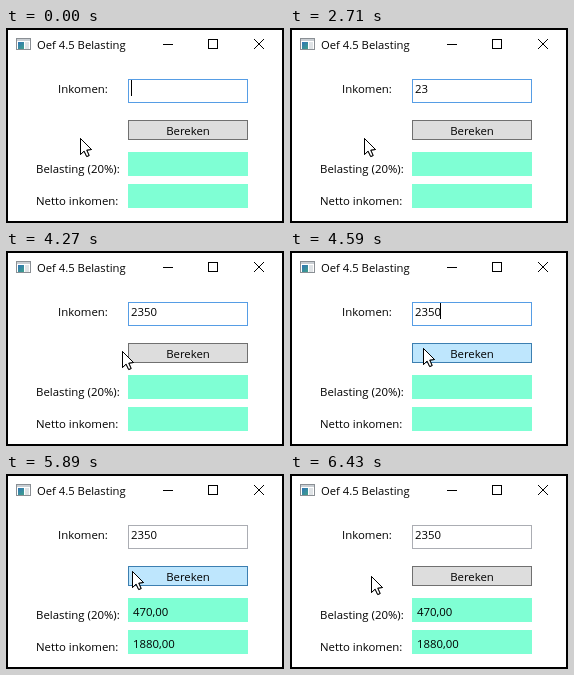
Write an HTML page with a canvas that moves like this. It is 278 px wide and 195 px high and loops after 8310 ms.

```html
<!DOCTYPE html>
<html lang="nl">
<head>
<meta charset="utf-8">
<title>Oef 4.5 Belasting</title>
<style>
html, body { margin: 0; width: 100%; height: 100%; overflow: hidden; background: #fff; }
canvas { display: block; width: 278px; height: 195px; }
</style>
</head>
<body>
<canvas id="stage"></canvas>
<script>
const W = 278, H = 195, LOOP = 8310;
const canvas = document.getElementById('stage');
const ctx = canvas.getContext('2d');
const dpr = window.devicePixelRatio || 1;
canvas.width = W * dpr;
canvas.height = H * dpr;

const FONT = '"Open Sans", "Noto Sans", sans-serif';
const INPUT = '2350';
const KEY_TIMES = [1760, 2170, 2950, 3250];
const CARET_ON = [[0, 220], [680, 1160], [1760, 2090], [2170, 2710], [2950, 3870], [4430, 4910]];
const PRESS = 4990, RELEASE = 5160, STEP = 80;

// Pointer positions, one per 80 ms step
const REST = [74, 110];
const APPROACH = [[86, 108], [102, 104], [116, 100], [125, 98], [130, 97], [132, 97], [133, 97]];
const LEAVE = [[126, 97], [115, 98], [105, 99], [97, 100], [91, 101], [86, 101], [83, 102], [81, 102]];

function pointerAt(t) {
  const pick = (list, start) => list[Math.min(list.length - 1, Math.floor((t - start) / STEP))];
  if (t < 4110) return REST;
  if (t < 5890) return pick(APPROACH, 4110);
  return pick(LEAVE, 5870);
}

function fill(x, y, w, h, color) {
  ctx.fillStyle = color;
  ctx.fillRect(x, y, w, h);
}

function box(x, y, w, h, border, inside) {
  fill(x, y, w, h, border);
  fill(x + 1, y + 1, w - 2, h - 2, inside);
}

function text(str, x, y, size = 11.4, align = 'left') {
  ctx.font = size + 'px ' + FONT;
  ctx.textAlign = align;
  ctx.fillStyle = '#000';
  ctx.fillText(str, x, y);
}

function line(points, color, close) {
  ctx.beginPath();
  points.forEach(([x, y]) => ctx.lineTo(x, y));
  if (close) ctx.closePath();
  ctx.strokeStyle = color;
  ctx.lineWidth = 1;
  ctx.stroke();
}

function drawIcon() {
  box(10, 10, 15, 12, '#8a8f94', '#fff');
  fill(11, 11, 13, 2, '#c9ced3');
  const pane = ctx.createLinearGradient(12, 14, 18, 21);
  pane.addColorStop(0, '#2f74b5');
  pane.addColorStop(1, '#3fa08c');
  fill(12, 14, 6, 7, pane);
  fill(19, 14, 4, 7, '#dfe3e6');
}

function drawWindow() {
  box(0, 0, W, H, '#000', '#000');
  fill(2, 2, W - 4, H - 4, '#fff');
  drawIcon();
  text('Oef 4.5 Belasting', 31, 21, 11.25);
  fill(157, 16, 10, 1, '#000');
  box(202, 11, 10, 10, '#000', '#fff');
  line([[248, 11], [258, 21]], '#000');
  line([[258, 11], [248, 21]], '#000');
  text('Inkomen:', 52, 65);
  text('Belasting (20%):', 30, 145);
  text('Netto inkomen:', 30, 177);
}

function drawInput(t) {
  const count = KEY_TIMES.filter(k => t >= k).length;
  box(122, 51, 120, 24, t < PRESS ? '#569de5' : '#abadb3', '#fff');
  text(INPUT.slice(0, count), 125, 65);
  if (CARET_ON.some(([a, b]) => t >= a && t < b)) {
    fill(Math.floor(125 + 6.47 * count), 52, 1, 16, '#000');
  }
}

function drawButton(t, [x, y]) {
  const hover = x >= 122 && x < 242 && y >= 92 && y < 112;
  const pressed = t >= PRESS && t < RELEASE;
  if (pressed) box(122, 92, 120, 20, '#2c628b', '#c4e5f6');
  else if (hover) box(122, 92, 120, 20, '#3c7fb1', '#bee6fd');
  else box(122, 92, 120, 20, '#707070', '#ddd');
  text('Bereken', 182, 107, 11.4, 'center');
}

function drawResults(t) {
  fill(122, 124, 120, 24, '#7fffd4');
  fill(122, 156, 120, 24, '#7fffd4');
  if (t >= RELEASE) {
    text('470,00', 127, 142);
    text('1880,00', 127, 174);
  }
}

function drawPointer([x, y]) {
  const shape = [[0, 0], [0, 16], [3.6, 12.6], [6.2, 18], [8.6, 17], [6.2, 11.6], [11, 11]];
  ctx.save();
  ctx.translate(x + 0.5, y + 0.5);
  line(shape, '#000', true);
  ctx.fillStyle = '#fff';
  ctx.fill();
  line(shape, '#000', true);
  ctx.restore();
}

function draw(t) {
  const pointer = pointerAt(t);
  ctx.setTransform(dpr, 0, 0, dpr, 0, 0);
  drawWindow();
  drawInput(t);
  drawButton(t, pointer);
  drawResults(t);
  drawPointer(pointer);
}

const start = performance.now();
function tick() {
  draw((performance.now() - start) % LOOP);
  requestAnimationFrame(tick);
}
tick();
</script>
</body>
</html>
```
